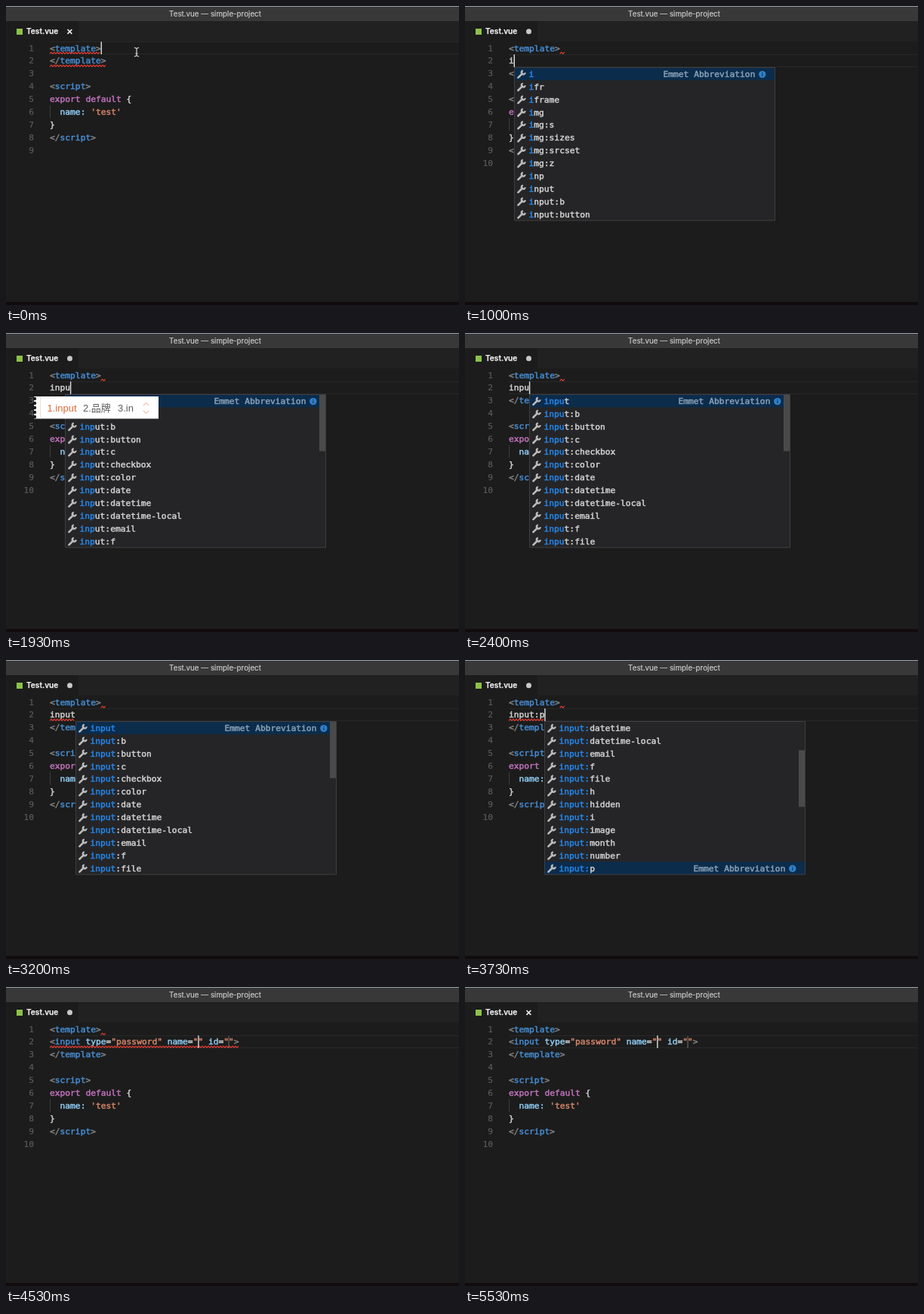
These frames come from a looping animation (600 by 396 pixels, 5740 ms). An HTML page with a canvas:

```html
<!DOCTYPE html>
<html lang="en">
<head>
<meta charset="utf-8">
<title>Editor completion</title>
<style>
html, body { margin: 0; width: 100%; height: 100%; overflow: hidden; background: #1c1c1c; }
canvas { display: block; width: 600px; height: 396px; }
</style>
</head>
<body>
<canvas id="stage"></canvas>
<script>
const W = 600, H = 396, LOOP = 5740;
const LEFT = 58, CH = 6.773, ROW = 16.88;
const MONO = '11.25px "DejaVu Sans Mono", monospace';
const UI = 'Inter, sans-serif';
const C = {
  punct: '#808080', tag: '#458cd2', key: '#bd70b8', prop: '#8fcaf0',
  str: '#d28468', text: '#d0d0d0', match: '#2586ea', squiggle: '#e03c32'
};

const canvas = document.getElementById('stage');
const ctx = canvas.getContext('2d');
const dpr = window.devicePixelRatio || 1;
canvas.width = W * dpr;
canvas.height = H * dpr;

// What has been typed on line 2, by time
const keys = [
  [-430, null], [530, ''], [870, 'i'], [1200, 'in'], [1470, 'inp'], [1930, 'inpu'],
  [2600, 'input'], [3400, 'input:'], [3660, 'input:p'], [4530, 'done']
];

const colon = ('b button c checkbox color date datetime datetime-local email f file ' +
  'h hidden i image month number p').split(' ').map(s => 'input:' + s);
const byInput = ['input', ...colon];
const byIn = ['inp', ...byInput];
const byI = ['i', 'ifr', 'iframe', 'img', 'img:s', 'img:sizes', 'img:srcset', 'img:z', ...byIn];
const byP = ['input:p', 'input:password'];

// time, column, items, matched letters, first item, selected row
const popups = [
  [930, 1, byI, 1, 0, 0], [1270, 2, byI, 1, 0, 0], [1400, 2, byIn, 2, 0, 0],
  [1525, 3, byIn, 2, 0, 0], [1660, 3, byIn, 3, 0, 0], [2000, 4, byInput, 3, 0, 0],
  [2130, 4, byInput, 4, 0, 0], [2670, 5, byInput, 5, 0, 0], [3470, 6, byInput, 5, 0, 0],
  [3600, 6, colon, 6, 0, 0], [3725, 7, colon, 6, 6, 11], [3860, 7, byP, 7, 0, 0], [4530, 0]
];

const latest = (list, t) => list.filter(e => e[0] <= t).pop();
const rowY = n => 55.6 + (n - 1) * ROW;

function rect(x, y, w, h, color) {
  ctx.fillStyle = color;
  ctx.fillRect(x, y, w, h);
}

function disc(x, y, r, color) {
  ctx.fillStyle = color;
  ctx.beginPath();
  ctx.arc(x, y, r, 0, Math.PI * 2);
  ctx.fill();
}

function path(points, color, width) {
  ctx.strokeStyle = color;
  ctx.lineWidth = width;
  ctx.beginPath();
  points.forEach(([x, y]) => ctx.lineTo(x, y));
  ctx.stroke();
}

function label(s, x, y, font, color, align = 'left', thicken = 0) {
  ctx.font = font;
  ctx.fillStyle = color;
  ctx.textAlign = align;
  ctx.fillText(s, x, y);
  if (!thicken) return;
  ctx.strokeStyle = color;
  ctx.lineWidth = thicken;
  ctx.lineJoin = 'round';
  ctx.strokeText(s, x, y);
}

function mono(s, x, y, color, align) {
  label(s, x, y + 4, MONO, color, align, 0.5);
}

function tokens(list, n) {
  let x = LEFT;
  for (const [s, kind] of list) {
    mono(s, x, rowY(n), C[kind]);
    x += s.length * CH;
  }
}

function tag(name, close) {
  return [[close ? '</' : '<', 'punct'], [name, 'tag'], ['>', 'punct']];
}

const inputTag = [
  ['<', 'punct'], ['input ', 'tag'], ['type', 'prop'], ['=', 'text'], ['"password" ', 'str'],
  ['name', 'prop'], ['=', 'text'], ['"" ', 'str'], ['id', 'prop'], ['=', 'text'],
  ['""', 'str'], ['>', 'punct']
];

function squiggle(from, to, n) {
  const y = rowY(n) + 6.7, points = [];
  const end = LEFT + to * CH;
  for (let x = LEFT + from * CH, i = 0; x <= end; x += 2, i++) points.push([x, y + (i % 2 ? -1.1 : 1.1)]);
  path(points, C.squiggle, 1.2);
}

function drawFrame(dirty) {
  rect(0, 0, W, H, '#1c1c1c');
  rect(0, 0, W, 20, '#383838');
  rect(0, 0, W, 1, '#98a4ac');
  label('Test.vue — simple-project', 277, 13.6, '9.8px ' + UI, '#cacaca', 'center', 0.2);
  rect(96, 20, W - 96, 27, '#212122');
  rect(14, 30, 8, 8, '#8dc149');
  label('Test.vue', 27, 37.4, '600 10.1px ' + UI, '#f0f0f0', 'left', 0.25);
  if (dirty) {
    disc(84.5, 33.8, 3.5, '#c8c8c8');
  } else {
    path([[81.5, 31], [87.3, 36.8]], '#eeeeee', 1.7);
    path([[87.3, 31], [81.5, 36.8]], '#eeeeee', 1.7);
  }
  rect(0, 392, W, 4, '#120b0e');
}

function drawCode(t, typed) {
  const shift = typed === null ? 0 : 1;
  const active = 1 + shift;
  rect(LEFT, Math.floor(rowY(active) - 8.4), W - LEFT, 1, '#282828');
  rect(LEFT, Math.floor(rowY(active) + 8), W - LEFT, 1, '#282828');
  for (let n = 1; n <= 9 + shift; n++) {
    label(String(n), 37, rowY(n) + 4, MONO, '#5a5a5a', 'right', 0.2);
  }

  tokens(tag('template'), 1);
  if (typed === 'done') tokens(inputTag, 2);
  else if (typed) tokens([[typed, 'text']], 2);
  const body = [
    tag('template', true), [], tag('script'),
    [['export default ', 'key'], ['{', 'text']],
    [['  name: ', 'prop'], ["'test'", 'str']],
    [['}', 'text']], tag('script', true)
  ];
  body.forEach((line, i) => tokens(line, 2 + shift + i));
  rect(LEFT, rowY(6 + shift) - 8.4, 1, ROW, '#3c3c3c');

  if (t < 660) {
    squiggle(0, 10, 1);
    squiggle(0, 11, 2 + shift);
  } else if (t < 4930) {
    squiggle(10, 11, 1);
    if (t >= 4530) squiggle(0, 37, 2);
    else if (t >= 3000) squiggle(0, typed.length, 2);
  }
}

function drawCaret(t, since, typed) {
  if (typed === 'done') rect(LEFT + 35 * CH - 0.5, 65, 1, 16, '#747474');
  if ((t - since) % 1000 >= 500) return;
  const col = typed === null ? 10 : typed === 'done' ? 29 : typed.length;
  const n = typed === null ? 1 : 2;
  rect(LEFT + col * CH - 0.2, rowY(n) - 8.2, 1.4, 16.6, '#e0e0e0');
}

function wrench(x, y) {
  const color = '#bcbcbc';
  ctx.lineCap = 'round';
  path([[x + 1.4, y + 4.6], [x + 7, y - 1]], color, 2.6);
  ctx.lineCap = 'butt';
  ctx.lineWidth = 2.2;
  ctx.beginPath();
  ctx.arc(x + 8.2, y - 2.2, 2.5, 0.05, Math.PI * 1.45);
  ctx.stroke();
}

function drawPopup([, col, items, hit, first, sel]) {
  const x = Math.round(LEFT + col * CH) + 0.5, top = 81.5, w = 345;
  const shown = items.slice(first, first + 12);
  const h = shown.length * ROW;
  rect(x, top, w, h, '#252527');
  shown.forEach((s, i) => {
    const y = 89.9 + i * ROW;
    if (i === sel) {
      rect(x, top + i * ROW, w, ROW, '#0c2c4c');
      mono('Emmet Abbreviation', x + 197, y, '#88a0b6');
      disc(x + 328.3, y + 0.7, 4.7, '#3180c8');
      rect(x + 327.8, y - 0.3, 1.1, 3.5, '#0c2c4c');
      rect(x + 327.8, y - 2.1, 1.1, 1.1, '#0c2c4c');
    }
    wrench(x + 3.5, y + 0.4);
    mono(s.slice(0, hit), x + 19, y, C.match);
    mono(s.slice(hit), x + 19 + hit * CH, y, C.text);
  });
  if (items !== byI && items.length > 12) {
    rect(x + 336.5, top + first / 32 * h, 8.5, 75, '#4a4a4b');
  }
  ctx.strokeStyle = '#3e3e40';
  ctx.lineWidth = 1;
  ctx.strokeRect(x, top, w, h);
}

function drawCandidates() {
  rect(37, 84, 165, 29.5, '#ffffff');
  for (let y = 87; y < 113; y += 6) disc(38, y, 2.2, '#1c1c1c');
  rect(45, 84, 1, 29.5, '#f3ddd2');
  const font = '13px "Liberation Sans", "Noto Sans CJK SC", "Noto Sans CJK", sans-serif';
  label('1.input', 54.5, 103.8, font, '#dc6a35');
  label('2.品牌', 102, 103.8, font, '#5c5c5c');
  label('3.in', 148, 103.8, font, '#5c5c5c');
  path([[182, 96], [185.5, 92.5], [189, 96]], '#e7a078', 1);
  path([[182, 103], [185.5, 106.5], [189, 103]], '#e7a078', 1);
}

function drawPointer(x, y) {
  for (const [color, width] of [['#1c1c1c', 3], ['#d8d8d8', 1.2]]) {
    path([[x, y - 5], [x, y + 5]], color, width);
    for (const d of [-1, 1]) path([[x - 3, y + d * 6], [x, y + d * 4.7], [x + 3, y + d * 6]], color, width);
    path([[x - 1.5, y + 2], [x + 1.5, y + 2]], color, width);
  }
}

function draw(t) {
  ctx.setTransform(dpr, 0, 0, dpr, 0, 0);
  const [since, typed] = latest(keys, t);
  const popup = latest(popups, t);
  drawFrame(t >= 530 && t < 5200);
  drawCode(t, typed);
  drawCaret(t, since, typed);
  if (popup && popup[1]) drawPopup(popup);
  if (t >= 1330 && t < 2395) drawCandidates();
  if (t < 530) drawPointer(173, 61);
}

const start = performance.now();
function tick() {
  draw((performance.now() - start) % LOOP);
  requestAnimationFrame(tick);
}
tick();
</script>
</body>
</html>
```
